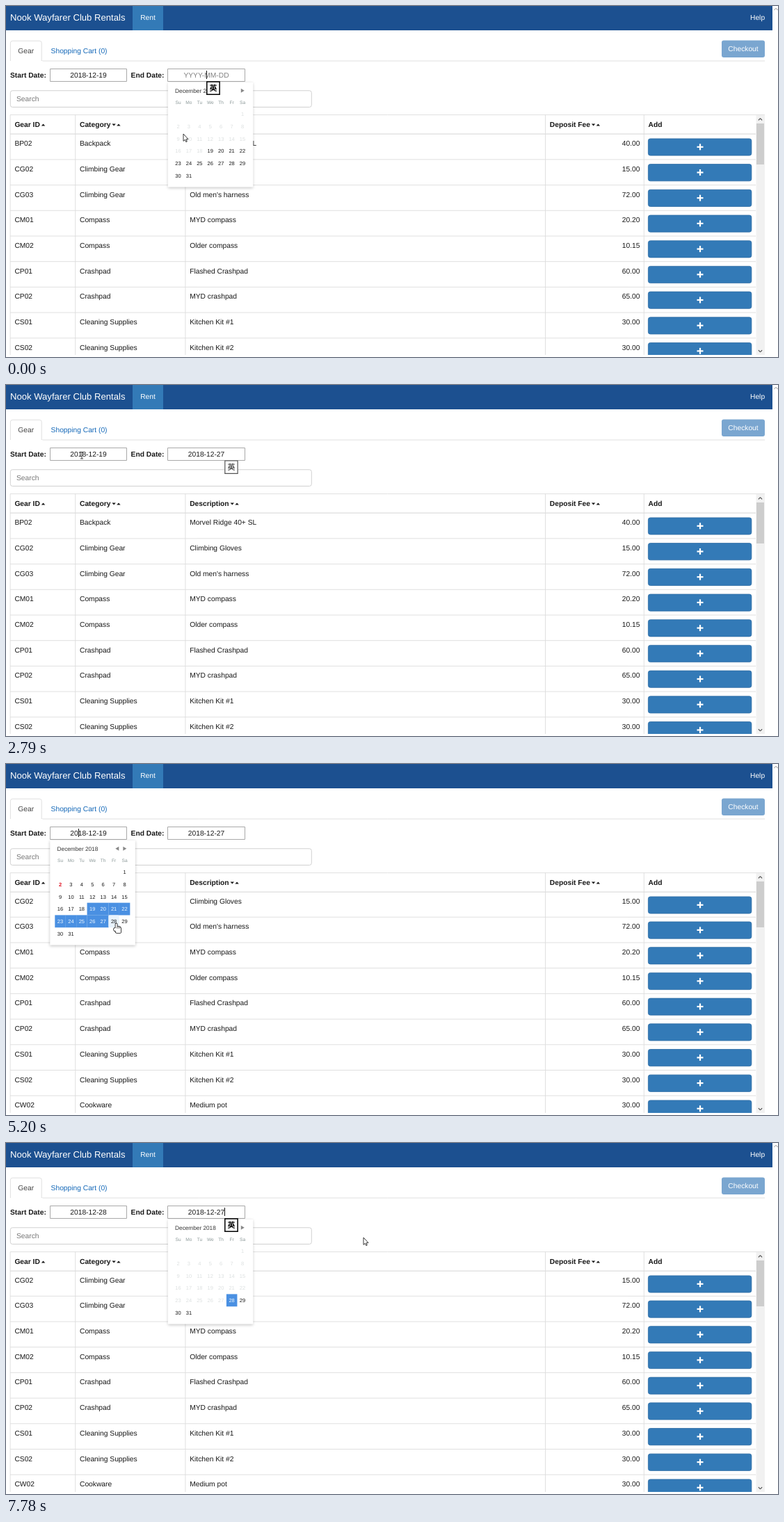
Recreate the animation shown at these times as an HTML page with a canvas. Size 1110 by 505 pixels, loop 8000 ms.

```html
<!DOCTYPE html>
<html lang="en">
<head>
<meta charset="utf-8">
<title>Gear rental dates</title>
<style>
  html, body { margin: 0; width: 100%; height: 100%; overflow: hidden; background: #fff; }
  canvas { display: block; }
</style>
</head>
<body>
<canvas id="stage" width="1110" height="505"></canvas>
<script>
const ctx = document.getElementById('stage').getContext('2d');
const LOOP = 8000, STEP = 120, GLIDE_STEPS = 5, BLINK = 1060;
const SANS = '"Liberation Sans", Arial, sans-serif';
const CJK = '"Noto Sans CJK SC", "Noto Sans CJK JP", sans-serif';
const INK = '#181818', LINE = '#dddddd', BLUE = '#337ab7';

const gear = [
  ['BP02', 'Backpack', 'Morvel Ridge 40+ SL', '40.00'],
  ['CG02', 'Climbing Gear', 'Climbing Gloves', '15.00'],
  ['CG03', 'Climbing Gear', "Old men's harness", '72.00'],
  ['CM01', 'Compass', 'MYD compass', '20.20'],
  ['CM02', 'Compass', 'Older compass', '10.15'],
  ['CP01', 'Crashpad', 'Flashed Crashpad', '60.00'],
  ['CP02', 'Crashpad', 'MYD crashpad', '65.00'],
  ['CS01', 'Cleaning Supplies', 'Kitchen Kit #1', '30.00'],
  ['CS02', 'Cleaning Supplies', 'Kitchen Kit #2', '30.00'],
  ['CW02', 'Cookware', 'Medium pot', '30.00']
];
const columns = [
  { title: 'Gear ID', x: 12.4, marks: ['up'] },
  { title: 'Category', x: 106, marks: ['down', 'up'] },
  { title: 'Description', x: 264.2, marks: ['down', 'up'] },
  { title: 'Deposit Fee', x: 781.8, marks: ['down', 'up'] },
  { title: 'Add', x: 923.6, marks: [] }
];

// What the user does, and when
const END_PICKED = 2310, TABLE_REFRESHED = 2910, START_HOVERED = 3030;
const START_OPENED = 3510, START_PICKED = 5320, END_OPENED = 5440;
const stops = [
  { at: 250, x: 267, y: 186 },
  { at: 1100, x: 306.5, y: 226.5 },
  { at: END_PICKED, x: 109, y: 101 },
  { at: TABLE_REFRESHED, x: 105, y: 100 },
  { at: 3990, x: 158.5, y: 229.5 },
  { at: START_PICKED, x: 289, y: 239 },
  { at: 5820, x: 277, y: 204 },
  { at: 6930, x: 514, y: 136 }
];

function text(str, x, y, { size = 10.25, color = INK, bold = false, align = 'left', font = SANS } = {}) {
  ctx.font = `${bold ? 'bold ' : ''}${size}px ${font}`;
  ctx.textAlign = align;
  ctx.fillStyle = color;
  ctx.fillText(str, x, y);
}
function rect(x, y, w, h, color) {
  ctx.fillStyle = color;
  ctx.fillRect(x, y, w, h);
}
function box(x, y, w, h, radius, fill, stroke, width = 1) {
  ctx.beginPath();
  ctx.roundRect(x, y, w, h, radius);
  if (fill) { ctx.fillStyle = fill; ctx.fill(); }
  if (stroke) { ctx.strokeStyle = stroke; ctx.lineWidth = width; ctx.stroke(); }
}
function line(x1, y1, x2, y2, color = LINE, width = 0.9) {
  ctx.beginPath();
  ctx.moveTo(x1, y1);
  ctx.lineTo(x2, y2);
  ctx.strokeStyle = color;
  ctx.lineWidth = width;
  ctx.stroke();
}
// Triangle with a vertical or horizontal base; the sign of reach points it
function triangle(x, y, halfBase, reach, vertical, color) {
  ctx.beginPath();
  [[-halfBase, 0], [halfBase, 0], [0, reach]].forEach(([a, b]) =>
    vertical ? ctx.lineTo(x + a, y + b) : ctx.lineTo(x + b, y + a));
  ctx.fillStyle = color;
  ctx.fill();
}
function chevron(x, y, dy, color) {
  line(x - 2.6, y + dy, x, y - dy, color, 1.2);
  line(x, y - dy, x + 2.6, y + dy, color, 1.2);
}

function drawHeader() {
  rect(0, 0, 1102, 35, '#1c5090');
  rect(182, 0, 44, 35, BLUE);
  text('Nook Wayfarer Club Rentals', 6, 21, { size: 13.1, color: '#fff' });
  text('Rent', 204, 20, { color: '#fff', align: 'center' });
  text('Help', 1070, 20, { color: '#fff' });
  chevron(1107, 4.5, 1.3, '#b5b5b5');

  line(6, 79, 1091, 79);
  box(6.4, 50.2, 44.8, 33, 3, '#fff', LINE, 0.9);
  rect(5, 79, 47.5, 6, '#fff');
  text('Gear', 17.3, 68.3, { color: '#444' });
  text('Shopping Cart (0)', 64.6, 68.3, { color: '#1468b8' });
  box(1029, 49.5, 62, 24.4, 3, '#7aa6d0');
  text('Checkout', 1060, 65.3, { color: '#fff', align: 'center' });
}

function drawField(label, labelX, field) {
  text(label, labelX, 102.7, { bold: true });
  box(field.x, 90.5, field.w, 18, 0, '#fff', field.hovered ? '#7db7ee' : '#a9a9a9');
  text(field.value || 'YYYY-MM-DD', field.x + field.w / 2, 102.7,
    { align: 'center', color: field.value ? INK : '#808080' });
}

function sortMark(x, direction) {
  if (direction === 'up') triangle(x, 172.5, 2.7, -3, true, INK);
  else triangle(x, 169.5, 2.7, 3, true, INK);
}

function drawTable(refreshed) {
  const rows = gear.slice(refreshed ? 1 : 0).slice(0, 9);
  ctx.save();
  ctx.beginPath();
  ctx.rect(5, 156, 1087, 346);
  ctx.clip();
  line(6, 156.6, 1091, 156.6);
  line(6, 184.1, 1078, 184.1, LINE, 1.4);
  for (const { title, x, marks } of columns) {
    line(x - 6.3, 156.5, x - 6.3, 502);
    text(title, x, 174, { bold: true });
    const end = x + ctx.measureText(title).width + 4.7;
    marks.forEach((mark, i) => sortMark(end + i * 6.8, mark));
  }
  rows.forEach((cells, i) => {
    const y = 184.2 + i * 36.7 - (refreshed && i ? 0.6 : 0);
    if (i) line(6, y, 1078, y);
    cells.slice(0, 3).forEach((cell, c) => text(cell, columns[c].x, y + 17));
    text(cells[3], 911.5, y + 17, { align: 'right' });
    box(923.4, y + 6.7, 148.5, 24.2, 3, BLUE, '#2e6da4', 0.8);
    rect(993.5, y + 17.5, 9, 2.2, '#fff');
    rect(996.9, y + 14.1, 2.2, 9, '#fff');
  });
  rect(1078.5, 157, 12.5, 345, '#f1f1f1');
  rect(1079, 169, 11, refreshed ? 66 : 59, '#cdcdcd');
  chevron(1084.5, 163, 1.4, '#505050');
  chevron(1084.5, 496.5, -1.4, '#505050');
  ctx.restore();
}

const CELL_W = 15.42, CELL_H = 17.75, GRID_TOP = 146.4;

function dayAt(cal, { x, y }) {
  const col = Math.floor((x - cal.x - 7) / CELL_W);
  const row = Math.floor((y - GRID_TOP) / CELL_H);
  const day = row * 7 + col - 5;
  return col >= 0 && col < 7 && row >= 0 && day >= cal.first && day <= 31 ? day : 0;
}

function drawCalendar(cal, hovered) {
  const { x } = cal;
  const canGoBack = cal.first === 1;
  ctx.save();
  ctx.shadowColor = 'rgba(0,0,0,.22)';
  ctx.shadowBlur = 4;
  ctx.shadowOffsetY = 1;
  rect(x, 110, 122.5, 150.5, '#fff');
  ctx.restore();
  text('December 2018', x + 10.3, 124.8, { size: 8.25, color: '#333' });
  triangle(x + 105, 121.7, 3, 5, false, '#888');
  if (canGoBack) triangle(x + 99, 121.7, 3, -5, false, '#888');
  ['Su', 'Mo', 'Tu', 'We', 'Th', 'Fr', 'Sa'].forEach((name, i) =>
    text(name, x + 7 + (i + 0.5) * CELL_W, 141.3, { size: 6.6, color: '#8b9898', align: 'center' }));

  for (let day = 1; day <= 31; day++) {
    const left = x + 7 + (day + 5) % 7 * CELL_W;
    const top = GRID_TOP + Math.floor((day + 5) / 7) * CELL_H;
    const selected = day >= cal.from && day <= cal.to;
    const today = day === 2 && canGoBack;
    if (selected) rect(left, top, CELL_W + 0.1, CELL_H + 0.1, '#4a90e2');
    else if (day === hovered) box(left, top, CELL_W, CELL_H, 2, '#e8f3fd');
    const color = selected ? '#f0f8ff' : day < cal.first ? '#dce0e0' : today ? '#e01020' : INK;
    text(day, left + CELL_W / 2, top + 11.6, { size: 7.5, color, bold: today, align: 'center' });
  }
}

function calendarAt(t) {
  if (t < END_PICKED) return { x: 232.8, first: 19 };
  if (t >= START_OPENED && t < START_PICKED) return { x: 63.3, first: 1, from: 19, to: 27 };
  if (t >= END_OPENED) return { x: 232.8, first: 28, from: 28, to: 28 };
}

function pointerAt(t) {
  let x = 255, y = 184;
  for (const stop of stops) {
    if (t < stop.at) break;
    const p = Math.min(1, (Math.floor((t - stop.at) / STEP) + 1) / GLIDE_STEPS);
    x += (stop.x - x) * p;
    y += (stop.y - y) * p;
  }
  return { x, y };
}

const pointers = {
  text() {
    line(0, -4.5, 0, 5, '#333');
    line(-2, -4.5, 2, -4.5, '#333');
    line(-2, 5, 2, 5, '#333');
  },
  hand() {
    ctx.beginPath();
    ctx.roundRect(-1, 0, 2.2, 9, 1);
    ctx.roundRect(-1, 4.5, 7.6, 9, [0, 3, 1, 2]);
    ctx.roundRect(-3.4, 6.6, 4, 4, 1.5);
    ctx.strokeStyle = '#111';
    ctx.lineWidth = 1.6;
    ctx.stroke();
    ctx.fillStyle = '#fff';
    ctx.fill();
    for (let x = 1.2; x < 6; x += 1.9) line(x, 4.8, x, 7, '#111', 0.7);
  },
  arrow() {
    const outline = new Path2D('M0 0V10.4L2.3 8.4L3.8 11.6L5.3 11L3.9 7.8L7 7.6Z');
    ctx.fillStyle = '#fff';
    ctx.fill(outline);
    ctx.strokeStyle = '#222';
    ctx.lineWidth = 0.9;
    ctx.stroke(outline);
  }
};

function drawPointer({ x, y }, kind) {
  ctx.save();
  ctx.translate(x, y);
  pointers[kind]();
  ctx.restore();
}

function drawIme(x, faded) {
  const color = faded ? '#555' : '#000';
  box(x, 109, 18.3, 18.3, 0, '#fff', color, faded ? 1.2 : 1.5);
  text('英', x + 9.2, 122.2, { size: 11, bold: true, color, align: 'center', font: CJK });
}

function draw(t) {
  const startField = {
    x: 63.5, w: 110,
    value: t < START_PICKED ? '2018-12-19' : '2018-12-28',
    hovered: t >= START_HOVERED && t < START_OPENED
  };
  const endField = { x: 232.5, w: 111, value: t < END_PICKED ? '' : '2018-12-27' };
  const pointer = pointerAt(t);
  const calendar = calendarAt(t);
  const hovered = calendar ? dayAt(calendar, pointer) : 0;

  ctx.textRendering = 'geometricPrecision';
  rect(0, 0, 1110, 505, '#fff');
  drawHeader();
  drawField('Start Date:', 6, startField);
  drawField('End Date:', 179.6, endField);
  box(6.3, 121.8, 433, 23.7, 3, '#fff', '#cccccc', 0.9);
  text('Search', 15, 137.3, { color: '#777' });
  drawTable(t >= TABLE_REFRESHED);
  if (calendar) drawCalendar(calendar, hovered);

  // The caret blinks in the focused field; a click restarts it in the start field
  const startFocused = t >= START_OPENED && t < START_PICKED;
  const refocusing = t >= END_PICKED && t < START_HOVERED;
  const caretX = startFocused ? 104 : endField.value ? 314 : 288;
  const blinkFrom = startFocused ? 3990 : 0;
  if (!refocusing && (t - blinkFrom) % BLINK < BLINK / 2) rect(caretX, 93, 1, 12, '#111');

  const imeResting = t >= 6430 && t < 6930;
  if (!startFocused && !imeResting) drawIme(caretX + 0.8, refocusing);

  const overField = pointer.y > 90 && pointer.y < 109 &&
    [startField, endField].some(({ x, w }) => pointer.x > x && pointer.x < x + w);
  drawPointer(pointer, hovered ? 'hand' : overField ? 'text' : 'arrow');
}

const began = performance.now();
function tick() {
  draw((performance.now() - began) % LOOP);
  requestAnimationFrame(tick);
}
tick();
</script>
</body>
</html>
```
